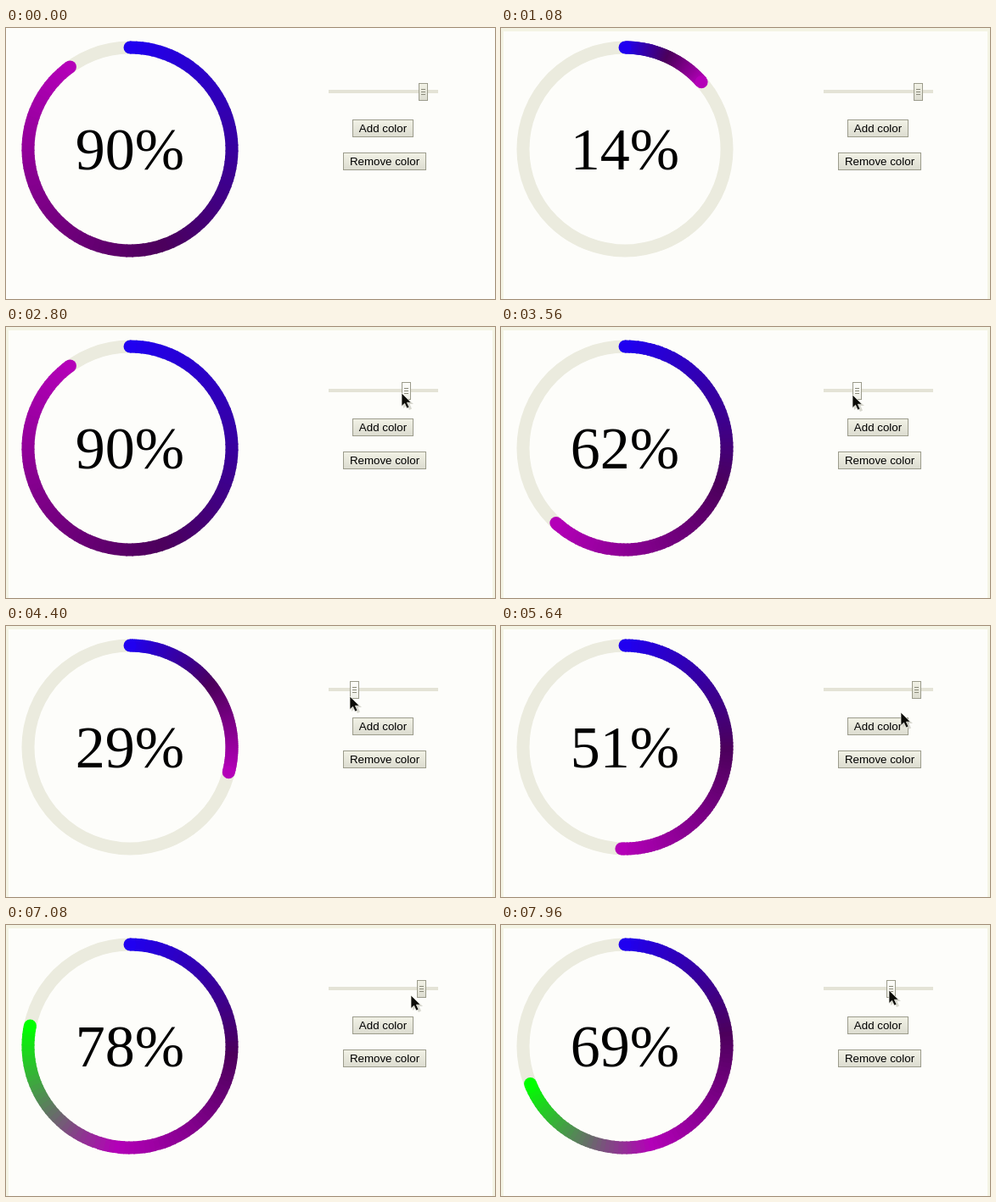
An HTML page that plays this animation: 576 by 320 pixels, repeating every 8 s.

```html
<!DOCTYPE html>
<html lang="en">
<head>
<meta charset="utf-8">
<title>Gradient progress ring</title>
<style>
  html, body { margin: 0; width: 100%; height: 100%; overflow: hidden; background: #fdfdfa; }
  svg { display: block; width: 576px; height: 320px; }
  .percent { font: 70px "Liberation Serif", "Times New Roman", serif; text-anchor: middle; }
  .label { font: 13.333px "Liberation Sans", Arial, sans-serif; text-anchor: middle; }
  .button { fill: url(#face); stroke: #9c9c8c; }
  .button.hover { fill: url(#lit); }
</style>
</head>
<body>
<svg viewBox="0 0 576 320" xmlns="http://www.w3.org/2000/svg">
  <defs>
    <linearGradient id="face" x2="0" y2="1">
      <stop offset="0" stop-color="#f2f2e6"/>
      <stop offset="1" stop-color="#dcdcd0"/>
    </linearGradient>
    <linearGradient id="lit" x2="0" y2="1">
      <stop offset="0" stop-color="#fdfdfa"/>
      <stop offset="1" stop-color="#f0f0e8"/>
    </linearGradient>
  </defs>
  <rect width="576" height="320" fill="#fdfdfa"/>
  <path id="edge" d="M0 0H576V320H573V4H3V320H0Z" fill="#f4f4e4"/>

  <circle cx="146" cy="143" r="120" fill="none" stroke="#ebebde" stroke-width="15"/>
  <g id="ring" fill="none" stroke-width="15"></g>
  <circle id="head" r="7.5"/>
  <circle id="tail" r="7.5"/>
  <text id="percent" class="percent" x="146" y="167"></text>

  <rect x="380" y="73" width="129" height="4" fill="#e4e3d6"/>
  <g id="thumb">
    <rect id="knob" class="button" x=".5" y="65.5" width="10" height="20"/>
    <path d="M3 72.5h5M3 75.5h5M3 78.5h5" stroke="#8c8c7c"/>
  </g>

  <rect id="add" class="button" x="408.5" y="108.5" width="71" height="20"/>
  <text class="label" x="444" y="123">Add color</text>
  <rect class="button" x="397.5" y="147.5" width="97" height="20"/>
  <text class="label" x="446" y="162">Remove color</text>

  <g id="cursor">
    <path d="M2 2V18L6 14.500L9 20L12 18.500L9.500 13H14Z" fill="#c8c8bc" opacity=".7"/>
    <path d="M0 0V15.500L3.600 12.200L6.200 18L9 16.800L6.400 11.200H11.300Z"
          fill="#0c0c08" stroke="#f4f4ec" stroke-width=".7"/>
  </g>
</svg>
<script>
const LOOP = 8000, SEGMENTS = 100, RADIUS = 120;
const RELOAD = 120, ADD_CLICK = 6330;
const BLUE = [32, 0, 240], PLUM = [76, 0, 92], MAGENTA = [180, 0, 184], GREEN = [0, 255, 0];
const $ = id => document.getElementById(id);

// Linear progress from 0 to 1
const ramp = (t, start, span) => Math.min(1, Math.max(0, (t - start) / span));
const easeOut = p => 1 - (1 - p) ** 3;

function ringValue(t) {
  if (t < RELOAD) return 90;
  if (t < ADD_CLICK)
    return 90 * ramp(t, 945, 905) - 69 * ramp(t, 2840, 1765) + 67 * ramp(t, 5200, 1000);
  return 88 * ramp(t, ADD_CLICK, 845) - 25 * ramp(t, 7640, 421);
}

const sliderValue = t =>
  90 - 69 * easeOut(ramp(t, 2640, 1780)) + 67 * ramp(t, 4800, 550) - 25 * ramp(t, 7600, 340);

// The pointer rides on the thumb, apart from its entry and a trip to the button
function pointer(t, thumbX) {
  const enter = ramp(t, 1840, 720), leave = ramp(t, 5320, 600);
  const x = thumbX + 105 * (1 - enter) - 24 * leave + 27 * ramp(t, 6500, 900);
  const y = 195 - 118 * enter + 6 * ramp(t, 2640, 1760) + 35 * leave - 41 * ramp(t, 6500, 680);
  return [x, y];
}

// Colours are spread evenly along the arc
function mix(colors, p) {
  const pos = p * (colors.length - 1);
  const i = Math.min(Math.floor(pos), colors.length - 2);
  return `rgb(${colors[i].map((c, n) => Math.round(c + (colors[i + 1][n] - c) * (pos - i)))})`;
}

function point(fraction) {
  const a = fraction * 2 * Math.PI;
  return [146 + RADIUS * Math.sin(a), 143 - RADIUS * Math.cos(a)];
}

function setDot(dot, fraction, fill) {
  const [x, y] = point(fraction);
  dot.setAttribute("cx", x);
  dot.setAttribute("cy", y);
  dot.setAttribute("fill", fill);
}

const arcs = Array.from({ length: SEGMENTS }, () =>
  $("ring").appendChild(document.createElementNS("http://www.w3.org/2000/svg", "path")));

function drawRing(value, colors) {
  const end = value / 100;
  arcs.forEach((arc, i) => {
    const from = end * i / SEGMENTS;
    // Small overlap hides the seams
    const to = Math.min(end, end * (i + 1) / SEGMENTS + .002);
    arc.setAttribute("d", `M${point(from)}A${RADIUS} ${RADIUS} 0 0 1 ${point(to)}`);
    arc.setAttribute("stroke", mix(colors, (i + .5) / SEGMENTS));
  });
  setDot($("tail"), end, mix(colors, 1));
  setDot($("head"), 0, mix(colors, 0));
  $("percent").textContent = Math.round(value) + "%";
}

function draw(t) {
  const colors = [BLUE, PLUM, MAGENTA];
  if (t >= ADD_CLICK) colors.push(GREEN);
  drawRing(ringValue(t), colors);

  const thumbX = Math.round(380 + 1.18 * sliderValue(t));
  const [x, y] = pointer(t, thumbX);
  const inside = (l, top, r, b) => x >= l && x <= r && y >= top && y <= b;
  $("thumb").setAttribute("transform", `translate(${thumbX})`);
  $("knob").classList.toggle("hover", inside(thumbX - 2, 65, thumbX + 13, 86));
  $("add").classList.toggle("hover", inside(408, 108, 480, 129));
  $("cursor").setAttribute("transform", `translate(${Math.round(x)} ${Math.round(y)})`);
  $("edge").style.display = t < 40 ? "none" : "";
}

const start = performance.now();
function tick() {
  draw((performance.now() - start) % LOOP);
  requestAnimationFrame(tick);
}
tick();
</script>
</body>
</html>
```
